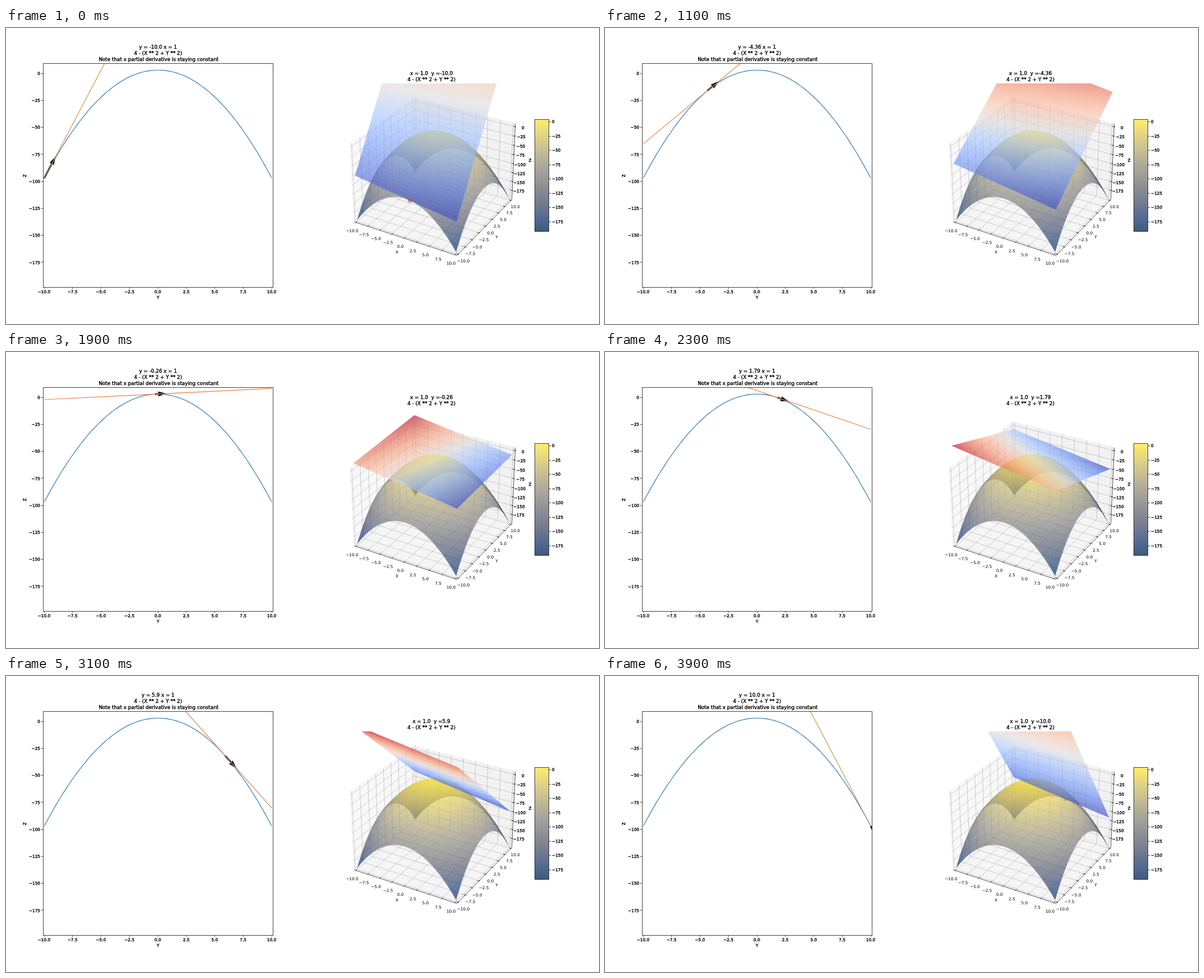
An HTML page with a canvas that plays this animation: 1058 by 529 pixels, repeating every 4000 ms.

```html
<!DOCTYPE html>
<html lang="en">
<head>
<meta charset="utf-8">
<title>Tangent line and tangent plane</title>
<style>
html, body { margin: 0; width: 100%; height: 100%; overflow: hidden; background: #fff; }
canvas, svg { position: absolute; left: 0; top: 0; width: 1058px; height: 529px; }
text { font: 7.35px "DejaVu Sans", Verdana, sans-serif; text-anchor: middle; white-space: pre; }
.title { font-size: 8.82px; }
.heavy { stroke: #000; stroke-width: .4px; }
.end { text-anchor: end; }
.start { text-anchor: start; }
.axis { stroke: #000; stroke-opacity: .75; stroke-width: 1; fill: none; shape-rendering: crispEdges; }
</style>
</head>
<body>
<canvas id="scene" width="1058" height="529"></canvas>
<svg id="plot" viewBox="0 0 1058 529">
  <defs>
    <clipPath id="frame"><rect x="66.5" y="63.5" width="410" height="400"/></clipPath>
    <linearGradient id="ramp" x1="0" y1="1" x2="0" y2="0"></linearGradient>
  </defs>
</svg>
<script>
const STEPS = 40, STEP_MS = 100, CELLS = 50, ALPHA = 0.62;
const svg = document.getElementById('plot');
const ctx = document.getElementById('scene').getContext('2d');

function el(tag, attrs, text, parent = svg) {
  const node = document.createElementNS('http://www.w3.org/2000/svg', tag);
  for (const k in attrs) node.setAttribute(k, attrs[k]);
  if (text !== undefined) node.textContent = text;
  parent.appendChild(node);
  return node;
}
const label = (x, y, text, cls = '') => el('text', { x, y, class: cls }, text);
const line = (x1, y1, x2, y2) => el('line', { x1, y1, x2, y2, class: 'axis' });
const minus = s => String(s).replace('-', '\u2212');
const range = (from, to, step) => {
  const out = [];
  for (let v = from; v <= to; v += step) out.push(v);
  return out;
};

// Colour maps
const parse = list => list.split(' ').map(h => [0, 2, 4].map(i => parseInt(h.substr(i, 2), 16)));
const CIVIDIS = parse('00224e 123570 35456c 4f576c 666970 7d7c78 948e77 aea371 c8b866 e5cf52 fee838');
const COOLWARM = parse('3b4cc0 5d7ce6 82a6fb aac7fd dddcdc f5c4ac f49a7b dd5f4b b40426');
function pick(map, t) {
  const p = Math.max(0, Math.min(1, t)) * (map.length - 1);
  const i = Math.min(map.length - 2, Math.floor(p));
  return 'rgb(' + map[i].map((c, k) => Math.round(c + (map[i + 1][k] - c) * (p - i))) + ')';
}

// Left chart
const TICKS = range(-10, 10, 2.5), LEVELS = range(-175, 0, 25);
const px = y => 271.2 + 20.3 * y;
const pz = z => 81 - 1.9314 * z;
const slice = y => 3 - y * y;

const inner = el('g', { 'clip-path': 'url(#frame)' });
const arrow = el('polygon', { fill: '#000' }, undefined, inner);
el('polyline', {
  points: range(-10, 10, 0.2).concat(10).map(y => px(y) + ',' + pz(slice(y))).join(' '),
  fill: 'none', stroke: '#2274b8', 'stroke-width': 1.15
}, undefined, inner);
const tangent = el('line', { 'stroke-width': 1.15 }, undefined, inner);

el('rect', { x: 66.5, y: 63.5, width: 410, height: 400, class: 'axis' });
for (const v of TICKS) {
  line(px(v), 464, px(v), 466);
  label(px(v) - 0.3, 473.6, minus(v.toFixed(1)), 'heavy');
}
for (const z of LEVELS) {
  line(63, pz(z), 66, pz(z));
  label(61, pz(z) + 2.7, minus(z), 'heavy end');
}
label(271.3, 483.7, 'Y', 'heavy');
el('text', { transform: 'translate(35.8 264) rotate(-90)', class: 'heavy' }, 'Z');
const leftTitle = label(271.3, 37, '', 'title heavy');
label(271.3, 47.6, '4 - (X ** 2 + Y ** 2)', 'title heavy');
label(272.3, 58.8, 'Note that x partial derivative is staying constant', 'title heavy');
const rightTitle = label(759, 83.6, '', 'title heavy');
label(759, 94.6, '4 - (X ** 2 + Y ** 2)', 'title heavy');

// Colour bar
CIVIDIS.forEach((c, i) => el('stop', { offset: i / 10, 'stop-color': `rgb(${c})` },
  undefined, document.getElementById('ramp')));
el('rect', { x: 943.5, y: 163.5, width: 25, height: 200, fill: 'url(#ramp)', 'fill-opacity': 0.75 });
el('rect', { x: 943.5, y: 163.5, width: 25, height: 200, class: 'axis' });
for (const z of LEVELS) {
  const y = 167.6 - 1.02 * z;
  line(969, y, 972, y);
  label(974, y + 2.7, minus(z), 'heavy start');
}

// Perspective view: elevation 30, azimuth -60, box 4:4:3
const HX = 0.5714, HZ = 0.42857, PANE = 25 / 24;
const C = Math.sqrt(3) / 2;
function view(X, Y, Z) {
  const d = 0.433 * X - 0.75 * Y + 0.5 * Z;
  const k = 177 / (1 - d / 10);
  return [764.3 + k * (C * X + 0.5 * Y), 259 - k * (-0.25 * X + 0.433 * Y + C * Z), d];
}
const project = (x, y, z) => view(x / 10 * HX, y / 10 * HX, (z + 96) / 100 * HZ);

function path(c, pts, closed) {
  c.beginPath();
  pts.forEach((p, i) => i ? c.lineTo(p[0], p[1]) : c.moveTo(p[0], p[1]));
  if (closed) c.closePath();
}

function surface(c, height, map, lo, hi, sorted) {
  const at = i => -10 + 20 * i / CELLS;
  const grid = [], quads = [];
  for (let i = 0; i <= CELLS; i++) {
    grid.push([]);
    for (let j = 0; j <= CELLS; j++) grid[i].push(project(at(i), at(j), height(at(i), at(j))));
  }
  for (let i = 0; i < CELLS; i++) for (let j = 0; j < CELLS; j++) {
    const pts = [grid[i][j], grid[i + 1][j], grid[i + 1][j + 1], grid[i][j + 1]];
    if (pts.every(p => p[1] < 97)) continue;
    const z = height(at(i + 0.5), at(j + 0.5));
    quads.push({ pts, color: pick(map, (z - lo) / (hi - lo)), d: pts.reduce((s, p) => s + p[2], 0) });
  }
  if (sorted) quads.sort((a, b) => a.d - b.d);
  c.save();
  c.beginPath();
  c.rect(594, 99, 330, 329);
  c.clip();
  c.globalAlpha = ALPHA;
  c.lineWidth = 0.2;
  for (const q of quads) {
    path(c, q.pts, true);
    c.fillStyle = c.strokeStyle = q.color;
    c.fill();
    c.stroke();
  }
  c.restore();
}

function layer(draw) {
  const cv = document.createElement('canvas');
  cv.width = 1058;
  cv.height = 529;
  draw(cv.getContext('2d'));
  return cv;
}

const E = 10 * PANE, LOW = -96 - 100 * PANE, TOP = -96 + 100 * PANE;
const box = layer(c => {
  const poly = pts => pts.map(p => project(...p));
  const pane = (fill, ...pts) => {
    path(c, poly(pts), true);
    c.fillStyle = fill;
    c.fill();
    c.strokeStyle = '#e8e8e8';
    c.stroke();
  };
  const stroke = (...pts) => { path(c, poly(pts)); c.stroke(); };
  c.lineWidth = 0.65;
  pane('#f8f8f8', [-E, -E, LOW], [-E, E, LOW], [-E, E, TOP], [-E, -E, TOP]);
  pane('#f2f2f2', [-E, E, LOW], [E, E, LOW], [E, E, TOP], [-E, E, TOP]);
  pane('#f5f5f5', [-E, -E, LOW], [E, -E, LOW], [E, E, LOW], [-E, E, LOW]);
  c.strokeStyle = '#b0b0b0';
  for (const v of TICKS) {
    stroke([v, -E, LOW], [v, E, LOW], [v, E, TOP]);
    stroke([E, v, LOW], [-E, v, LOW], [-E, v, TOP]);
  }
  for (const z of LEVELS) stroke([E, E, z], [-E, E, z], [-E, -E, z]);
  c.strokeStyle = '#000';
  stroke([-E, -E, LOW], [E, -E, LOW], [E, E, LOW], [E, E, TOP]);
  c.lineWidth = 0.8;
  for (const v of TICKS) {
    stroke([v, -E - 0.17, LOW], [v, -E + 0.33, LOW]);
    stroke([E + 0.17, v, LOW], [E - 0.33, v, LOW]);
  }
  for (const z of LEVELS) stroke([E + 0.17, E, z], [E - 0.33, E, z]);
});

const OUT = E + 1.3, UNDER = LOW - 13;
for (const v of TICKS) {
  const text = minus(v.toFixed(1));
  const a = project(v, -OUT, UNDER), b = project(OUT, v, UNDER);
  label(a[0], a[1] + 2.7, text);
  label(b[0] - 3, b[1] + 2.7, text);
}
for (const z of LEVELS) {
  const p = project(E, E, z);
  label(p[0] + (z ? 11.6 : 14), p[1] + 4, minus(z), 'heavy');
}
label(697.5, 403.3, 'X');
label(875.5, 376, 'Y');
label(935, 238.6, 'Z', 'heavy');

const dome = layer(c => surface(c, (x, y) => 4 - x * x - y * y, CIVIDIS, -192, 4, true));

function drawChart(y0) {
  const z0 = slice(y0), slope = -2 * y0;
  const fade = Math.max(0, (Math.abs(y0) - 5) / 5);
  const ends = { x1: px(-10), y1: pz(z0 + slope * (-10 - y0)), x2: px(10), y2: pz(z0 + slope * (10 - y0)) };
  for (const k in ends) tangent.setAttribute(k, ends[k]);
  tangent.setAttribute('stroke', pick([[238, 122, 62], [200, 146, 62]], fade));

  const dx = 20.3, dy = -1.9314 * slope, len = Math.hypot(dx, dy), w = 1.5;
  const half = [[0, w], [len - 13.8, w], [len - 15.3, 3 * w]];
  const pts = [...half, [len, 0], ...half.reverse().map(p => [p[0], -p[1]])];
  arrow.setAttribute('points', pts.join(' '));
  arrow.setAttribute('transform',
    `translate(${px(y0)} ${pz(z0)}) rotate(${Math.atan2(dy, dx) * 180 / Math.PI})`);

  const r = Math.round(y0 * 100) / 100;
  const text = Number.isInteger(r) ? r.toFixed(1) : String(r);
  leftTitle.textContent = `y = ${text} x = 1`;
  rightTitle.textContent = `x = 1.0  y =${text}`;
}

function drawScene(y0) {
  const z0 = slice(y0);
  const plane = (x, y) => z0 - 2 * (x - 1) - 2 * y0 * (y - y0);
  const corners = [plane(-10, -10), plane(-10, 10), plane(10, -10), plane(10, 10)];
  ctx.clearRect(0, 0, 1058, 529);
  ctx.drawImage(box, 0, 0);
  const dot = project(1, y0, z0);
  ctx.fillStyle = '#ee8a48';
  ctx.beginPath();
  ctx.arc(dot[0], dot[1], 3.6, 0, 2 * Math.PI);
  ctx.fill();
  ctx.drawImage(dome, 0, 0);
  surface(ctx, plane, COOLWARM, Math.min(...corners), Math.max(...corners), false);
}

let shown = -1;
const start = performance.now();
function tick() {
  const step = Math.floor((performance.now() - start) / STEP_MS) % STEPS;
  if (step !== shown) {
    shown = step;
    const y0 = -10 + 20 * step / (STEPS - 1);
    drawChart(y0);
    drawScene(y0);
  }
  requestAnimationFrame(tick);
}
tick();
</script>
</body>
</html>
```
